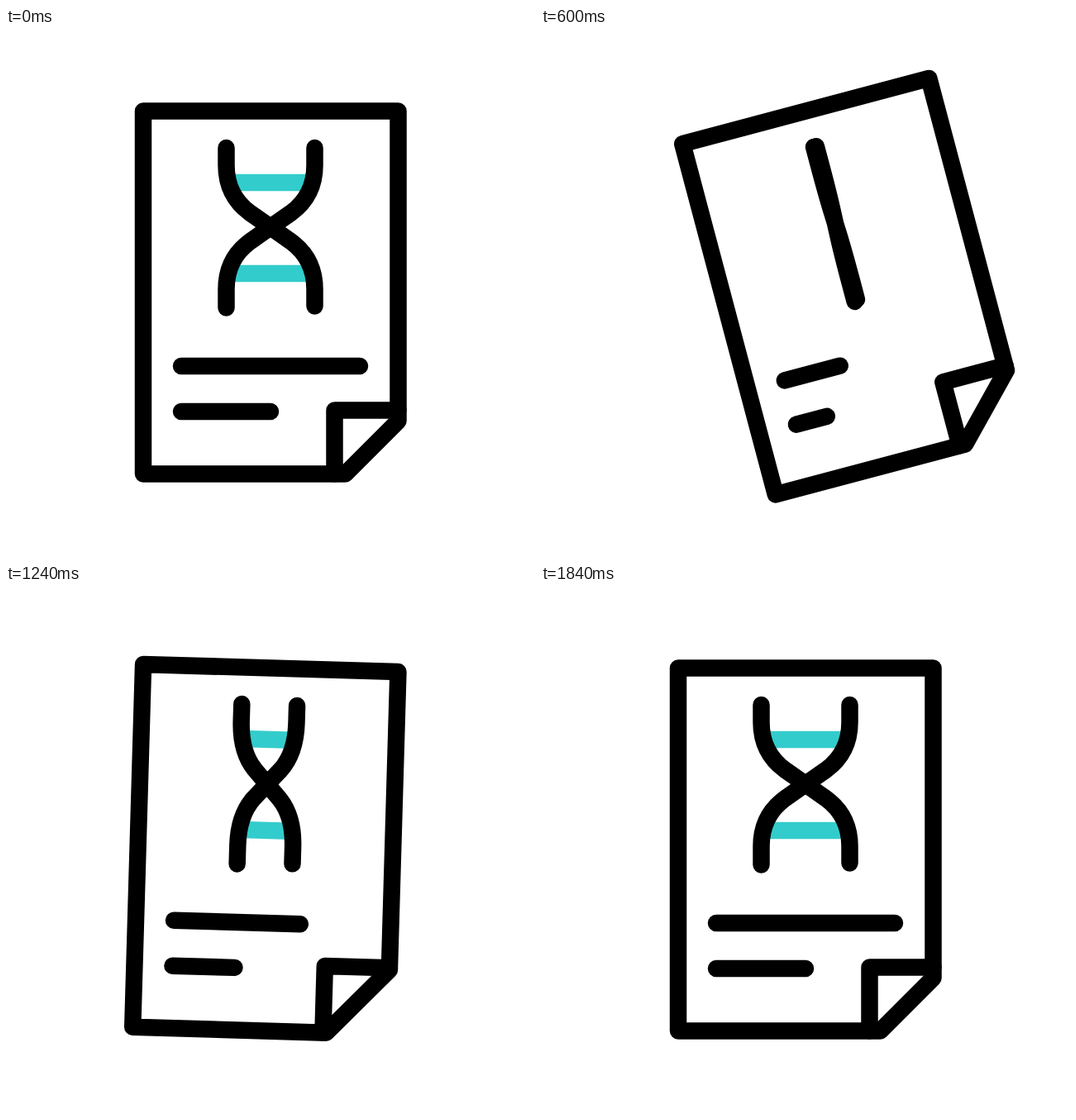
An HTML page that plays this animation: 640 by 640 pixels, repeating every 2 s.

```html
<!DOCTYPE html>
<html lang="en">
<head>
<meta charset="utf-8">
<title>DNA report</title>
<style>
  html, body { margin: 0; width: 100%; height: 100%; overflow: hidden; background: #fff; }
  svg { display: block; width: 100%; height: 100%; }
</style>
</head>
<body>
<svg viewBox="0 0 640 640" fill="none" stroke="#000" stroke-width="20.5" stroke-linecap="round" stroke-linejoin="round">
  <g id="page">
    <path id="bars" stroke="#33cccc" stroke-linecap="butt"/>
    <path id="strands"/>
    <path id="outline"/>
    <path id="fold"/>
    <path id="lines"/>
  </g>
</svg>
<script>
  const LOOP = 2000, STEP = 40;

  // Each track is a list of [time in ms, value], eased between neighbours.
  const tracks = {
    angle: [[140, 0], [540, -15.7], [1060, 7], [1430, -4.1], [1840, 0]],
    twist: [[175, 1], [1010, -1], [1010, 1], [1840, -1]],
    curl: [[140, 0], [1000, 1], [1840, 0]],
    longLine: [[190, 216], [640, 66], [905, 192], [1440, 135], [1840, 216]],
    shortLine: [[140, 108], [505, 22], [912, 140], [1225, 75], [1840, 108]]
  };

  const part = id => document.getElementById(id);
  const setPath = (id, d) => part(id).setAttribute('d', d);

  function valueAt(keys, time) {
    if (time <= keys[0][0]) return keys[0][1];
    for (let i = 1; i < keys.length; i++) {
      const [t0, v0] = keys[i - 1], [t1, v1] = keys[i];
      if (time < t1) {
        const p = (time - t0) / (t1 - t0);
        return v0 + (v1 - v0) * p * p * (3 - 2 * p);
      }
    }
    return keys[keys.length - 1][1];
  }

  function strand(scale, endY) {
    const x = offset => 320 + offset * scale;
    return `M${x(-53.5)} 145V166C${x(-53.5)} 192 ${x(-42)} 211 ${x(-25)} 223.5` +
      `L${x(25)} 258.5C${x(42)} 271 ${x(53.5)} 290 ${x(53.5)} 316V${endY}`;
  }

  function draw(time) {
    const at = name => valueAt(tracks[name], time);
    const width = Math.abs(at('twist'));
    const curl = at('curl');
    const foldX = 397.5 - 1.5 * curl, foldY = 462.5 - 4.5 * curl;
    const cutX = 410.5 - 13 * curl, cutY = 475.5 - 17.5 * curl;
    const barHalf = 46 * width;

    part('page').setAttribute('transform', `rotate(${at('angle')} 320.25 100.5)`);
    setPath('bars', [187, 297].map(y => `M${320 - barHalf} ${y}H${320 + barHalf}`).join(''));
    setPath('strands', strand(width, 336.5) + strand(-width, 338.5));
    setPath('outline', `M${cutX} 539.5H166V100.5H474.5V${cutY}Z`);
    setPath('fold', `M474.5 ${foldY}H${foldX}V539.5`);
    setPath('lines', `M212 409h${at('longLine')}M212 464h${at('shortLine')}`);
  }

  const start = performance.now();
  function tick() {
    const time = (performance.now() - start) % LOOP;
    draw(Math.floor(time / STEP) * STEP);
    requestAnimationFrame(tick);
  }
  tick();
</script>
</body>
</html>
```
